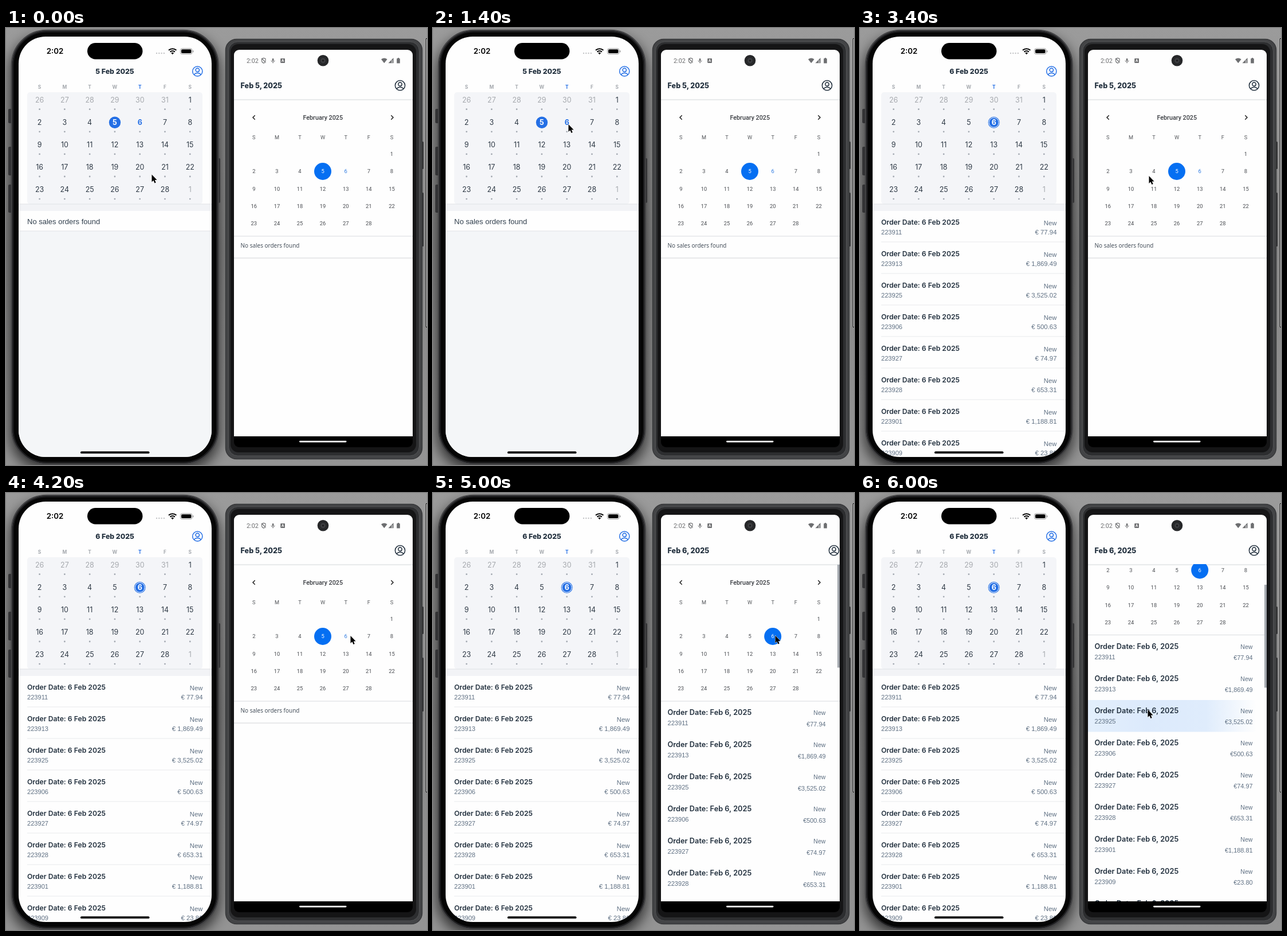
Recreate the animation shown at these times as an HTML page. Size 735 by 762 pixels, loop 6.2 s.

```html
<!DOCTYPE html>
<html lang="en">
<head>
<meta charset="utf-8">
<title>Sales order calendar</title>
<style>
html, body { margin: 0; width: 100%; height: 100%; overflow: hidden; background: #8f8f8f; }
svg { display: block; width: 735px; height: 762px; }
.inter { font-family: Inter, sans-serif; }
.robo { font-family: Roboto, sans-serif; }
.noto { font-family: "Noto Sans", sans-serif; }
.lib { font-family: "Liberation Sans", Arial, sans-serif; }
</style>
</head>
<body>
<svg id="stage" viewBox="0 0 735 762" xmlns="http://www.w3.org/2000/svg">
  <defs>
    <linearGradient id="wall" x2="0" y2="1">
      <stop offset="0" stop-color="#9b9b9b"/><stop offset=".5" stop-color="#878787"/><stop offset="1" stop-color="#949494"/>
    </linearGradient>
    <linearGradient id="press">
      <stop offset="0" stop-color="#e3effc"/><stop offset=".35" stop-color="#dceafc"/>
      <stop offset=".7" stop-color="#dfecfc"/><stop offset="1" stop-color="#fefefe"/>
    </linearGradient>
    <filter id="blur" x="-20%" y="-20%" width="140%" height="140%"><feGaussianBlur stdDeviation="11"/></filter>
    <clipPath id="leftClip"><rect x="22" y="15" width="337" height="733" rx="47"/></clipPath>
    <clipPath id="rightClip"><rect x="398" y="38" width="312" height="674"/></clipPath>
    <clipPath id="scrollClip"><rect x="398" y="124" width="312" height="588"/></clipPath>
  </defs>
  <rect width="735" height="762" fill="url(#wall)"/>
  <rect x="7" y="14" width="366" height="756" rx="60" opacity=".65" filter="url(#blur)"/>
  <path d="M735 18.5H733.5V521.5H735" fill="#fff" stroke="#000"/>

  <g fill="#333335">
    <rect x="4" y="141" width="7" height="25" rx="2"/><rect x="4" y="207" width="7" height="50" rx="2"/>
    <rect x="4" y="273" width="7" height="49" rx="2"/><rect x="368" y="227" width="6" height="78" rx="2"/>
    <rect x="724" y="198" width="5" height="48" rx="1.5"/><rect x="724" y="287" width="5" height="94" rx="1.5"/>
  </g>
  <rect x="10" y="4" width="360.5" height="756" rx="61" fill="#050505" stroke="#414143" stroke-width="2.5"/>
  <rect x="12.5" y="6.5" width="355.5" height="751" rx="58" fill="none" stroke="#1f1f21" stroke-width="2"/>
  <rect x="22" y="15" width="337" height="733" rx="47" fill="#fefefe"/>
  <g id="left" clip-path="url(#leftClip)"></g>
  <rect x="142" y="26" width="96.5" height="28.5" rx="14.2"/>
  <rect x="130" y="738.3" width="120.5" height="3.8" rx="1.9"/>

  <rect x="383.5" y="19.5" width="343" height="732" rx="19" fill="#434446" stroke="#37383a" stroke-width="1.5"/>
  <rect x="388.5" y="24" width="333" height="722" rx="16" fill="#2d2e30" stroke="#535456"/>
  <rect x="392" y="28" width="324" height="712" rx="14" fill="#151516"/>
  <rect x="398" y="38" width="312" height="693" rx="9" fill="#000"/>
  <path d="M398 712V47a9 9 0 0 1 9-9H701a9 9 0 0 1 9 9V712Z" fill="#fefefe"/>
  <g id="right" clip-path="url(#rightClip)"></g>
  <rect x="512" y="719.7" width="82.5" height="2.8" rx="1.4" fill="#fff"/>
  <circle cx="553.5" cy="56.8" r="9.8" fill="#262729"/><circle cx="553.5" cy="56.8" r="4.5" fill="#3a3b3e"/><circle cx="553.5" cy="56.8" r="1.6" fill="#1a1a1c"/>

  <path id="mouse" d="M0 0V13L2.9 10.3L5 15L7.2 14L5.2 9.5H9.1Z" stroke="#fff" stroke-width="1" stroke-linejoin="round" paint-order="stroke"/>
</svg>
<script>
const NS = "http://www.w3.org/2000/svg";
const $ = id => document.getElementById(id);

function add(parent, tag, attrs) {
  const el = document.createElementNS(NS, tag);
  for (const k in attrs) el.setAttribute(k, attrs[k]);
  return parent.appendChild(el);
}
// y is the middle of the capitals
function text(parent, str, x, y, size, cls, fill, anchor = "start", weight = 400) {
  const el = add(parent, "text", { x, y: y + size * 0.36, "font-size": size, class: cls, fill,
    "text-anchor": anchor, "font-weight": weight });
  el.textContent = str;
  return el;
}
const rect = (p, x, y, width, height, fill, rx = 0) => add(p, "rect", { x, y, width, height, fill, rx });
const circle = (p, cx, cy, r, fill) => add(p, "circle", { cx, cy, r, fill });
const path = (p, d, fill, stroke = "none", w = 1) => add(p, "path", { d, fill, stroke, "stroke-width": w });
const show = (el, on) => el.setAttribute("display", on ? "inline" : "none");

function account(p, x, y, color) {
  const g = add(p, "g", { transform: `translate(${x} ${y})`, fill: "none", stroke: color, "stroke-width": 1.5 });
  add(g, "circle", { r: 8.6 });
  add(g, "circle", { cy: -2.2, r: 3.2 });
  add(g, "path", { d: "M-5.7 6.2C-4.6 1.9 4.6 1.9 5.7 6.2" });
  return g;
}

const INK = "#22303e", SLATE = "#5e6f82", BLUE = "#246fe5", DEEP = "#056ff2";
const orders = [["223911", "77.94"], ["223913", "1,869.49"], ["223925", "3,525.02"], ["223906", "500.63"],
  ["223927", "74.97"], ["223928", "653.31"], ["223901", "1,188.81"], ["223909", "23.80"], ["223912", "64.50"]];

function buildLeft() {
  const g = $("left"), days = {};
  text(g, "2:02", 85.5, 40.5, 13.3, "inter", "#000", "middle", 600);
  for (let i = 0; i < 4; i++) circle(g, 263 + i * 4.3, 44, 1.2, "#c4c5c7");
  path(g, "M284 38.8A10 10 0 0 1 297.4 38.8M286.5 41.6A6.3 6.3 0 0 1 294.9 41.6", "none", "#000", 2.1);
  path(g, "M288.3 43.6A3.6 3.6 0 0 1 293.1 43.6L290.7 46.2Z", "#000");
  add(g, "rect", { x: 304.5, y: 35.8, width: 20.5, height: 9.8, rx: 3, fill: "none", stroke: "#9a9a9a" });
  rect(g, 306, 37.3, 17.5, 6.8, "#000", 1.8);
  rect(g, 326, 39, 1.4, 3.5, "#9a9a9a", 0.7);
  const title = text(g, "", 190, 75.8, 12.3, "inter", INK, "middle", 800);
  account(g, 334.3, 75.5, BLUE);

  rect(g, 37, 112, 306, 195, "#f4f5f8", 5);
  const mark5 = circle(g, 190, 164.8, 10.2, BLUE);
  const mark6 = add(g, "g", {});
  circle(mark6, 233.7, 164.8, 10, BLUE);
  add(mark6, "circle", { cx: 233.7, cy: 164.8, r: 8.5, fill: "none", stroke: "#fff" });
  for (let c = 0; c < 7; c++) {
    const x = 58.6 + c * 43.78;
    text(g, "SMTWTFS"[c], x, 103.2, 8.4, "inter", c == 4 ? BLUE : "#a5a9ae", "middle", 700);
    for (let r = 0; r < 5; r++) {
      const n = r * 7 + c - 5, y = 125.2 + r * 39.1;
      const out = n < 1 || n > 28;
      const day = n < 1 ? n + 31 : n > 28 ? n - 28 : n;
      const el = text(g, day, x, y, 12.5, "inter", out ? "#a6a9ae" : "#2f3a46", "middle");
      if (!out) days[n] = el;
      circle(g, x, y + 16.5, 1.4, "#a2a8b0");
    }
  }
  rect(g, 22, 307, 337, 12, "#f2f3f6");
  rect(g, 22, 306.5, 337, 1, "#e1e4e8");

  const empty = add(g, "g", {});
  text(empty, "No sales orders found", 37, 337, 13, "lib", "#33414f");
  rect(empty, 22, 354, 337, 400, "#f4f6f8");
  rect(empty, 22, 353.5, 337, 1, "#e1e4e8");

  const list = add(g, "g", {});
  orders.slice(0, 8).forEach(([id, sum], i) => {
    const y = i * 55;
    text(list, "Order Date: 6 Feb 2025", 37, 339 + y, 12.2, "inter", INK, "start", 600);
    text(list, id, 37, 355.6 + y, 11.1, "lib", SLATE);
    text(list, "New", 343.5, 340 + y, 11.4, "lib", SLATE, "end");
    text(list, "€ " + sum, 343.5, 355.6 + y, 11.4, "lib", SLATE, "end");
    rect(list, 37, 372.5 + y, 322, 1, "#e9ebee");
  });
  return s => {
    const six = s.left > 0;
    title.textContent = (six ? 6 : 5) + " Feb 2025";
    show(mark5, !six); show(mark6, six);
    days[5].setAttribute("fill", six ? "#2f3a46" : "#fff");
    days[5].setAttribute("font-weight", six ? 400 : 700);
    days[6].setAttribute("fill", six ? "#fff" : BLUE);
    days[6].setAttribute("font-weight", 700);
    show(empty, s.left < 2); show(list, s.left == 2);
  };
}

function buildRight() {
  const g = $("right"), gray = "#6d6e70", days = {};
  text(g, "2:02", 420, 57, 10.8, "robo", gray);
  path(g, "M446.5 53.5L449.8 52.4L453 53.5V57Q453 60 449.8 61.3Q446.5 60 446.5 57ZM446.5 53L453.5 60.5", "none", gray, 1.1);
  rect(g, 464.8, 53, 2.6, 5, gray, 1.3);
  path(g, "M463 56.5Q463.2 59.4 466.1 59.4Q469 59.4 469.2 56.5M466.1 59.4V61.5", "none", gray, 0.9);
  rect(g, 479.2, 53, 7.8, 8, gray, 1);
  text(g, "A", 483.1, 57, 6.5, "robo", "#fff", "middle", 700);
  path(g, "M655 54.4Q660.3 50.5 665.6 54.4L660.3 61.2Z", gray);
  path(g, "M667.5 61.2L676.5 52V61.2Z", gray);
  path(g, "M674 56V61.2", "none", "#fefefe", 1);
  path(g, "M682.2 53.2H683.8V52H686.2V53.2H687.8V61.4H682.2Z", gray);
  const title = text(g, "", 409.5, 100, 12.6, "inter", INK, "start", 800);
  const user = account(g, 688, 100.2, INK);
  rect(g, 398, 124.3, 312, 1.2, "#dcdee1");
  rect(g, 398, 125.5, 312, 1, "#f2f3f4");

  const view = add(g, "g", { "clip-path": "url(#scrollClip)" });
  const page = add(view, "g", {});
  const press = rect(page, 398, 476.5, 294, 55.5, "url(#press)");
  path(page, "M434.7 152.2L431 156L434.7 159.8M672.3 152.2L676 156L672.3 159.8", "none", "#222", 1.5);
  text(page, "February 2025", 553.3, 156, 10.8, "robo", "#3a3d42", "middle", 500);
  const mark = circle(page, 553, 250, 15, DEEP);
  for (let c = 0; c < 7; c++) {
    const x = 432.8 + c * 40.1;
    text(page, "SMTWTFS"[c], x, 190.7, 9.2, "robo", "#55585c", "middle");
    for (let r = 0; r < 5; r++) {
      const n = r * 7 + c - 5;
      if (n > 0 && n < 29) days[n] = text(page, n, x, 219.6 + r * 30.35, 9.4, "robo", "#484b50", "middle");
    }
  }
  rect(page, 398, 362.5, 312, 1, "#dadcdf");

  const empty = add(page, "g", {});
  text(empty, "No sales orders found", 409.5, 379.2, 9.95, "noto", "#46505b");
  rect(empty, 398, 400.5, 312, 1.2, "#dadcdf");
  const list = add(page, "g", {});
  orders.forEach(([id, sum], i) => {
    const y = i * 56;
    text(list, "Order Date: Feb 6, 2025", 409.5, 382.5 + y, 12.75, "inter", INK, "start", 600);
    text(list, id, 409.5, 401.2 + y, 11.1, "lib", SLATE);
    text(list, "New", 685.5, 383.5 + y, 10.6, "lib", SLATE, "end");
    text(list, "€" + sum, 685.5, 402.7 + y, 10.9, "lib", SLATE, "end");
  });
  const thumb = rect(view, 706, 125, 4, 179.5, "#a3a8ae");

  return s => {
    const six = s.right > 0;
    title.textContent = `Feb ${six ? 6 : 5}, 2025`;
    mark.setAttribute("cx", six ? 593.2 : 553);
    days[5].setAttribute("fill", six ? "#484b50" : "#fff");
    days[6].setAttribute("fill", six ? "#fff" : "#2b78e0");
    show(empty, s.right < 2); show(list, s.right == 2); show(thumb, s.right == 2);
    show(press, s.press);
    user.setAttribute("transform", `translate(${s.nudge ? 700 : 688} 100.2)`);
    page.setAttribute("transform", `translate(0 ${-s.scroll})`);
    thumb.setAttribute("y", 125 + s.scroll * 0.303);
  };
}

// Pointer stops: time, x, y
const stops = [[0, 254.5, 255.5], [200, 252, 241], [400, 246, 207], [600, 239, 179], [800, 236.5, 168],
  [2800, 258, 194], [3000, 350, 251], [3200, 446, 264], [3400, 504.5, 258], [3600, 566, 252], [3800, 596, 250],
  [4000, 601.5, 249], [4400, 597.5, 248.5], [5200, 578, 318], [5400, 528, 436], [5600, 502.5, 493], [5800, 502.5, 436], [6000, 502.5, 378]];
const LOOP = 6200, STEP = 200;
const drawLeft = buildLeft(), drawRight = buildRight();
let last = -1;

function draw(time) {
  const t = Math.floor(time % LOOP / STEP) * STEP;
  if (t == last) return;
  last = t;
  const [, x, y] = stops.filter(s => s[0] <= t).pop();
  $("mouse").setAttribute("transform", `translate(${x} ${y})`);
  drawLeft({ left: t < 1800 ? 0 : t < 2000 ? 1 : 2 });
  drawRight({
    right: t < 4600 ? 0 : t < 4800 ? 1 : 2,
    nudge: t >= 4800 && t < 5200,
    scroll: t < 5800 ? 0 : t < 6000 ? 57 : 115.5,
    press: t >= 5800
  });
}

const start = performance.now();
function tick() {
  draw(performance.now() - start);
  requestAnimationFrame(tick);
}
tick();
</script>
</body>
</html>
```
